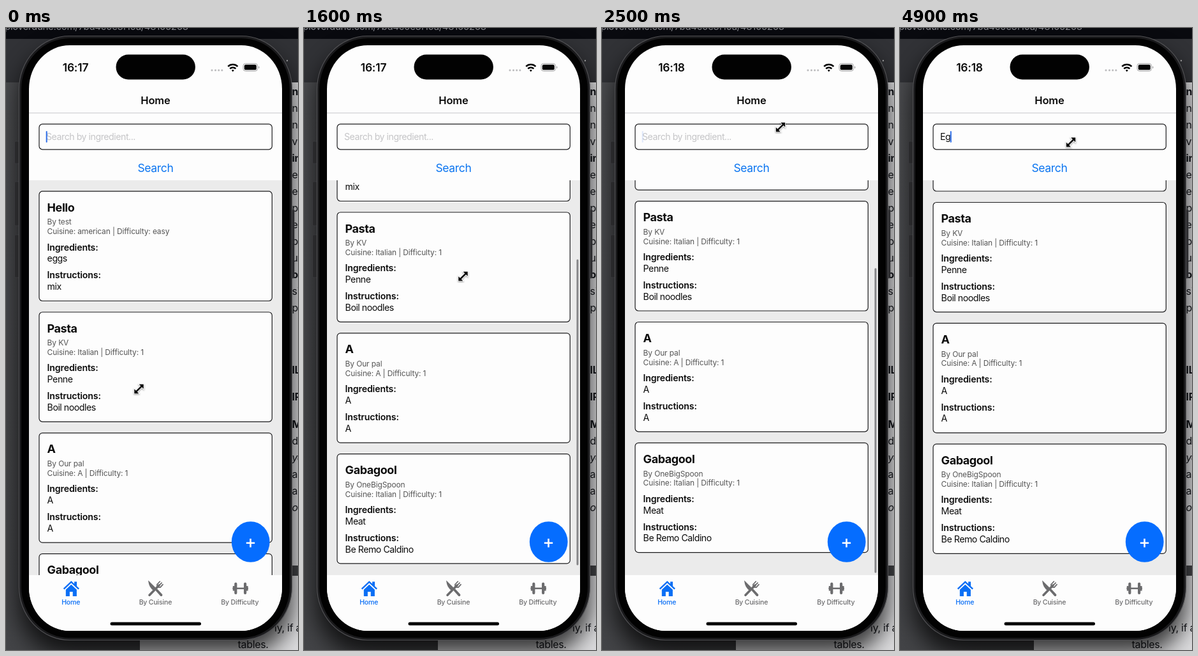
Write an HTML page that moves like this. It is 458 px wide and 972 px high and loops after 5 s.

```html
<!DOCTYPE html>
<html lang="en">
<head>
<meta charset="utf-8">
<title>Recipe app</title>
<style>
  html, body { margin: 0; width: 100%; height: 100%; overflow: hidden; background: #333437; }
  svg { display: block; width: 458px; height: 972px; }
  text { font-family: Inter, Roboto, sans-serif; letter-spacing: -.02em; fill: #0c0c0c; }
  .mid { text-anchor: middle; }
  .bold { font-weight: 600; letter-spacing: -.012em; }
  .title { font-size: 18px; font-weight: 700; letter-spacing: -.024em; }
  .meta { font-size: 12px; letter-spacing: -.012em; fill: #555; }
  .body { font-size: 14.2px; }
  .body:not(.bold) { letter-spacing: -.034em; }
  .tab { font-size: 10.6px; font-weight: 500; fill: #6c6c6e; }
  .menu { font-size: 11.3px; fill: #404042; }
  .paper text { font-size: 16px; fill: #15171c; }
  .box { fill: #fdfdfd; stroke: #1c1c1e; stroke-width: 1.2; }
  #pointer { filter: drop-shadow(0 1px 1px #0006); }
</style>
</head>
<body>
<svg viewBox="0 0 458 972">
  <defs>
    <linearGradient id="desk" x2="0" y2="1">
      <stop offset="0" stop-color="#4c4d50"/>
      <stop offset="1" stop-color="#434447"/>
    </linearGradient>
    <filter id="blur" x="-20%" y="-20%" width="140%" height="140%"><feGaussianBlur stdDeviation="18"/></filter>
    <filter id="soft" x="-30%" y="-60%" width="160%" height="220%"><feGaussianBlur stdDeviation="6"/></filter>
    <clipPath id="screen"><rect x="36" y="27" width="397" height="915" rx="64" ry="68"/></clipPath>
    <clipPath id="listArea"><rect x="36" y="238" width="397" height="617"/></clipPath>
  </defs>

  <!-- desktop behind the phone -->
  <rect width="458" height="972" fill="url(#desk)"/>
  <rect x="210" y="85" width="248" height="755" fill="#dcdcde"/>
  <rect x="210" y="856" width="248" height="116" fill="#dcdcde"/>
  <g class="paper" id="paper"></g>
  <rect width="458" height="85" fill="#313236"/>
  <rect width="458" height="17" fill="#090a0f"/>
  <text x="-2" y="2.5" font-size="15" style="fill:#85868c">ploverdune.com/7bd4c0e3f19a/48105263</text>
  <circle cx="441" cy="51" r="1.2" fill="#aaa"/>
  <rect x="20" y="34" width="429" height="945" rx="78" opacity=".75" filter="url(#blur)"/>

  <!-- phone -->
  <g fill="#29292b" stroke="#3c3c3f" stroke-width=".8">
    <rect x="13.5" y="177" width="9" height="35" rx="2"/>
    <rect x="13.5" y="240" width="9" height="69" rx="2"/>
    <rect x="13.5" y="323" width="9" height="67" rx="2"/>
    <rect x="445" y="284" width="7" height="107" rx="2"/>
  </g>
  <rect x="20.5" y="12.5" width="428" height="944" rx="79" ry="83" fill="#1a1a1c" stroke="#505053" stroke-width="1.2"/>
  <rect x="24" y="16" width="421" height="937" rx="76" ry="80" fill="#020202"/>

  <g clip-path="url(#screen)">
    <rect x="36" y="27" width="397" height="915" fill="#fdfdfd"/>
    <rect x="36" y="238" width="397" height="617" fill="#ebebeb"/>
    <g clip-path="url(#listArea)"><g id="list"></g></g>
    <rect id="bar" x="427.5" width="3" rx="1.5" fill="#858587"/>

    <path d="M36 132.8H433" stroke="#d9d9db" stroke-width="1.5"/>
    <text class="mid bold" id="clock" x="109" y="68" font-size="17.5"></text>
    <rect x="172.5" y="41.6" width="124.4" height="38.8" rx="19.4" fill="#020202"/>
    <path d="M323 66h.01M328.5 66h.01M333.7 66h.01M338.8 66h.01" stroke="#bdbdbf" stroke-width="3.2" stroke-linecap="round"/>
    <g fill="none" stroke="#050505" stroke-width="2.5">
      <path d="M348.2 60.2a10.8 10.8 0 0 1 15.2 0M351.2 63.6a6.6 6.6 0 0 1 9.2 0"/>
      <path d="M355.8 64.9l-2 1.2 2 2.3 2-2.3z" fill="#050505" stroke="none"/>
    </g>
    <rect x="372" y="55.5" width="22.5" height="11.8" rx="3.6" fill="none" stroke="#a4a4a6"/>
    <rect x="373.7" y="57.2" width="19.1" height="8.4" rx="2.2" fill="#050505"/>
    <path d="M396 59.6a2 2 0 0 1 0 3.8z" fill="#a4a4a6"/>
    <text class="mid bold" x="234.4" y="119" font-size="16.5">Home</text>

    <rect class="box" x="52" y="150.2" width="365.3" height="39.6" rx="5.2"/>
    <text class="body" id="query" x="63" y="175"></text>
    <rect id="caret" y="161" width="2" height="18" rx="1" fill="#2f6fe8"/>
    <text class="mid" x="234.4" y="225" font-size="17.5" style="fill:#0a74f0">Search</text>

    <ellipse cx="383.7" cy="803" rx="29.9" ry="31.8" fill="#056dff"/>
    <path d="M376.8 804.7h13.4M383.5 798v13.4" stroke="#fff" stroke-width="2.6"/>

    <!-- tab bar -->
    <rect x="36" y="855" width="397" height="87" fill="#fdfdfd"/>
    <g fill="#0b6ff5">
      <path d="M89.8 875.8L102.3 864l4.8 4.4v-3.2h4v7l3.9 3.6-1.7 1.8-11-10.3-10.8 10.3z"/>
      <path d="M93.8 877.7l8.5-8 8.6 8v10.2h-6.2v-6.8h-4.8v6.8h-6.1z"/>
    </g>
    <g fill="none" stroke="#6c6c6e" stroke-linecap="round">
      <path d="M225 886.2L240 871" stroke-width="3.6"/>
      <path d="M237 869.5q-.8 5 5 4.6M237 869.5l4.3-4.5M239.6 871.7l4.5-4.5M242 874.1l4-4.4" stroke-width="1.8"/>
      <path d="M236.5 878.5l7 7.6" stroke-width="3.8"/>
      <path d="M224 865l11.5 11.4-3 2.8q-7.7-5-8.5-14.2z" fill="#6c6c6e" stroke-width="1.4"/>
    </g>
    <path d="M360.3 868.5v14.4M375.1 868.5v14.4" stroke="#6c6c6e" stroke-width="4.2" stroke-linecap="round"/>
    <path d="M355.5 875.7h24.4" stroke="#6c6c6e" stroke-width="2.6"/>
    <path d="M357.3 872v7.4M378.1 872v7.4" stroke="#6c6c6e" stroke-width="3"/>
    <text class="tab mid" x="101.7" y="900.5" style="fill:#0b6ff5">Home</text>
    <text class="tab mid" x="234.4" y="900.5">By Cuisine</text>
    <text class="tab mid" x="366.8" y="900.5">By Difficulty</text>
    <rect x="163.5" y="928.6" width="142.5" height="5" rx="2.5" fill="#050505"/>

    <g id="menu">
      <rect x="56" y="116" width="119" height="36" rx="10" opacity=".13" filter="url(#soft)"/>
      <path d="M67 114.5h97q9 0 9 9v17q0 9-9 9h-79l-6 4.5-6-4.500h-6q-9 0-9-9v-17q0-9 9-9z" fill="#f7f7f7"/>
      <path d="M113 115v34" stroke="#e6e6e7"/>
      <text class="menu mid" x="84.5" y="136.5">Paste</text>
      <text class="menu mid" x="142" y="136.5">AutoFill</text>
    </g>
  </g>

  <path id="pointer" d="M7.2-7.2V-.2L4.6-2.8-2.8 4.6-.2 7.2h-7v-7l2.600 2.600 7.400-7.400L.2-7.200z"
        fill="#060606" stroke="#fff" stroke-width="1.8" paint-order="stroke"/>
</svg>
<script>
const $ = id => document.getElementById(id);
const LOOP = 5000, FRAME = 100, MAX_SCROLL = 171.5;

const recipes = [
  ['Hello', 'test', 'american', 'easy', 'eggs', 'mix'],
  ['Pasta', 'KV', 'Italian', '1', 'Penne', 'Boil noodles'],
  ['A', 'Our pal', 'A', '1', 'A', 'A'],
  ['Gabagool', 'OneBigSpoon', 'Italian', '1', 'Meat', 'Be Remo Caldino']
];

const line = (cls, y, str) => `<text class="${cls}" x="64.6" y="${y}">${str}</text>`;

$('list').innerHTML = recipes.map(([name, author, cuisine, level, items, steps], i) =>
  `<g transform="translate(0 ${255.2 + i * 188.8})">
    <rect class="box" x="52" width="365.3" height="171.3" rx="5.2"/>
    ${line('title', 31.7, name)}
    ${line('meta', 52.3, 'By ' + author)}
    ${line('meta', 67.2, `Cuisine: ${cuisine} | Difficulty: ${level}`)}
    ${line('body bold', 92.4, 'Ingredients:')}
    ${line('body', 110.3, items)}
    ${line('body bold', 136.3, 'Instructions:')}
    ${line('body', 154.2, steps)}
  </g>`).join('');

// Text on the page behind: a start height, then words set 26 px apart
const passages = [
  [105, '*nt no no vi *in e e p e p u *on si p'],
  [540, '*IL'], [582, '*IR'],
  [625, '*M d /yo a a /on']
];
$('paper').innerHTML = passages.map(([top, words]) => words.split(' ').map((word, i) => {
  const style = word[0] === '*' ? 'font-weight="700"' : word[0] === '/' ? 'font-style="italic"' : '';
  return `<text x="448.5" y="${top + i * 26}" ${style}>${word.replace(/[*/]/, '')}</text>`;
}).join('')).join('') +
  '<text x="421" y="942.5">ly, if a</text><text x="363.5" y="969">tables.</text>';

// Piecewise linear track through [time, value] points
function track(points, t) {
  const next = points.findIndex(p => p[0] > t);
  if (next < 0) return points[points.length - 1][1];
  if (next === 0) return points[0][1];
  const [t0, a] = points[next - 1], [t1, b] = points[next];
  return a + (b - a) * (t - t0) / (t1 - t0);
}

const pointerX = [[0, 208.5], [600, 215], [1000, 234.5], [1600, 249.5], [2200, 271.5], [2500, 280], [2650, 279], [3000, 268]];
const pointerY = [[0, 564], [600, 544], [1000, 463], [1600, 388], [2200, 257], [2500, 155], [2600, 147], [3000, 178.5]];
const scrollY = [[0, 0], [600, 0], [1000, 81.3], [1600, 156], [1700, 173], [2200, 196], [2500, 173.3], [2600, 171.5]];
const barFade = [[500, 0], [700, 1], [3400, 1], [3700, 0]];
const menuFade = [[3300, 0], [3400, .9], [3500, 1], [4600, 1], [4800, 0]];
const caretBlink = [[400, 1], [500, .15], [600, 0], [800, 0], [900, .6], [1000, 1]];

function draw(t) {
  const scroll = track(scrollY, t);
  $('list').setAttribute('transform', `translate(0 ${-scroll})`);

  const over = Math.max(0, scroll - MAX_SCROLL);
  $('bar').setAttribute('y', 241 + .773 * (scroll - over) + over);
  $('bar').setAttribute('height', 478 - over);
  $('bar').setAttribute('opacity', track(barFade, t));

  $('clock').textContent = t < 2000 ? '16:17' : '16:18';

  const typed = t < 4700 ? '' : t < 4900 ? 'E' : 'Eg';
  $('query').textContent = typed || 'Search by ingredient...';
  $('query').style.fill = typed ? '#0c0c0c' : '#c5c5c7';
  $('caret').setAttribute('x', typed ? 62.5 + $('query').getComputedTextLength() : 62.7);
  $('caret').setAttribute('opacity', t < 2900 ? track(caretBlink, t % 1000) : 1);

  $('menu').setAttribute('opacity', track(menuFade, t));
  $('pointer').setAttribute('transform', `translate(${track(pointerX, t)} ${track(pointerY, t)})`);
}

const start = performance.now();
function tick() {
  const t = (performance.now() - start) % LOOP;
  draw(Math.floor(t / FRAME) * FRAME);
  requestAnimationFrame(tick);
}
tick();
</script>
</body>
</html>
```
